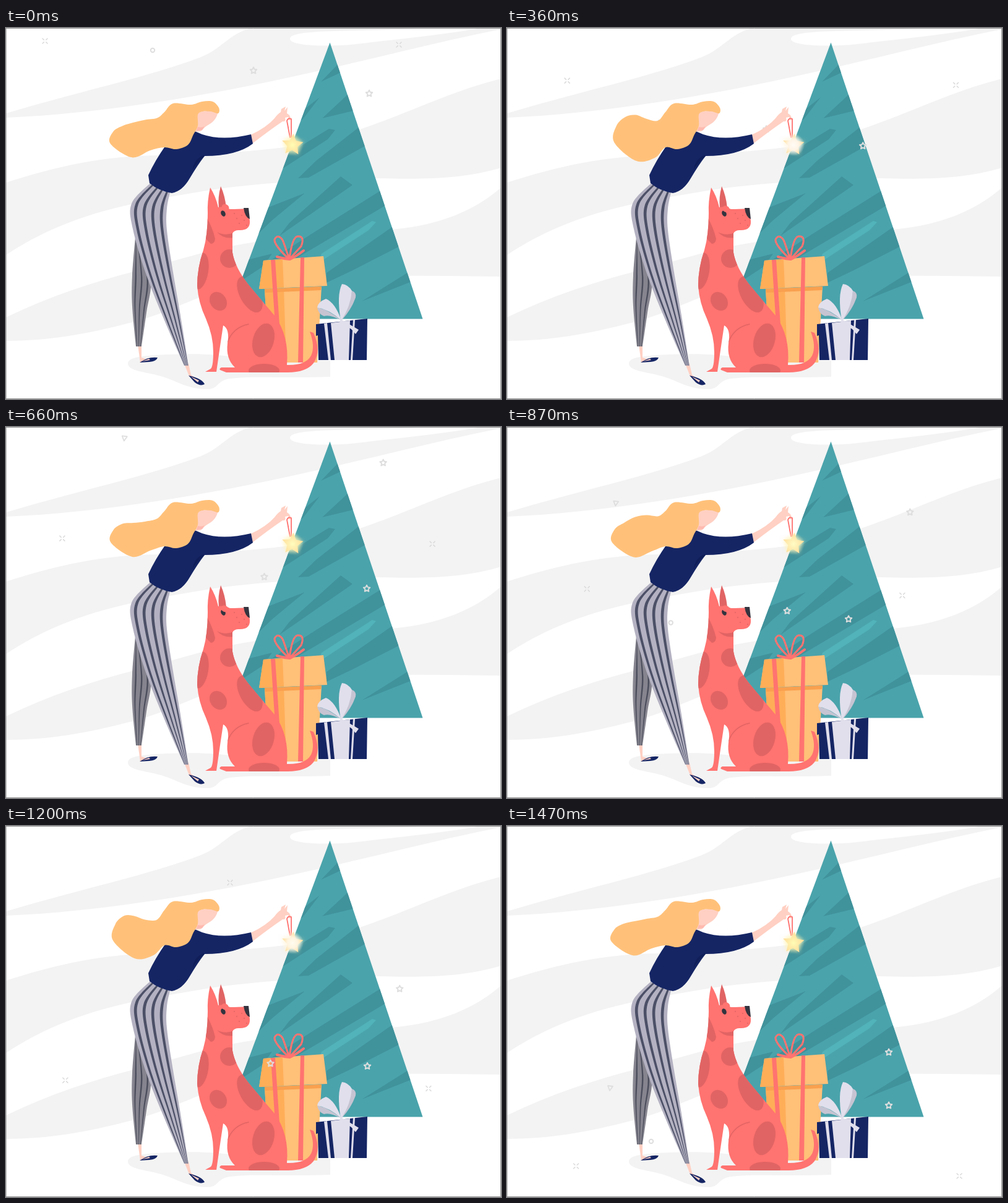
These frames come from a looping animation (800 px wide and 600 px high, 1500 ms). An HTML page with a canvas:

```html
<!DOCTYPE html>
<html lang="en">
<head>
<meta charset="utf-8">
<title>Trimming the tree</title>
<style>
html, body { margin: 0; width: 100%; height: 100%; overflow: hidden; background: #fff; }
canvas { display: block; }
</style>
</head>
<body>
<canvas id="stage" width="800" height="600"></canvas>
<script>
const ctx = document.getElementById('stage').getContext('2d');
const LOOP = 1500, STEP = 30;
const NAVY = '#152564', CORAL = '#ff7370', SPOT = '#e16464', SKIN = '#ffd0c3', HAIR = '#ffc17a',
  MIST = '#f3f3f3', TEAL = '#4aa3ab', DARK_TEAL = '#40929b', LILAC = '#e1dfec', GRAY_LILAC = '#c6c4d2';
const { PI, sin, cos, max } = Math;
const mix = (a, b, u) => a + (b - a) * u;

function fill(color, d) {
  ctx.fillStyle = color;
  ctx.fill(new Path2D(d));
}

function line(color, width, d) {
  ctx.strokeStyle = color;
  ctx.lineWidth = width;
  ctx.stroke(new Path2D(d));
}

function ellipse(color, x, y, rx, ry, angle = 0) {
  ctx.fillStyle = color;
  ctx.beginPath();
  ctx.ellipse(x, y, rx, ry, angle, 0, PI * 2);
  ctx.fill();
}

function clipped(d, draw) {
  ctx.save();
  ctx.clip(new Path2D(d));
  draw();
  ctx.restore();
}

// Adds a smooth curve through the points to the current path.
function trace(pts, closed = false) {
  const n = pts.length;
  const at = i => pts[closed ? (i + n) % n : Math.min(max(i, 0), n - 1)];
  ctx.lineTo(...pts[0]);
  for (let i = 0; i < (closed ? n : n - 1); i++) {
    const [p, a, b, q] = [at(i - 1), at(i), at(i + 1), at(i + 2)];
    ctx.bezierCurveTo(a[0] + (b[0] - p[0]) / 6, a[1] + (b[1] - p[1]) / 6,
      b[0] - (q[0] - a[0]) / 6, b[1] - (q[1] - a[1]) / 6, b[0], b[1]);
  }
}

function starPath(x, y, r, inner, turn = 0) {
  ctx.beginPath();
  for (let i = 0; i < 10; i++) {
    const a = turn - PI / 2 + i * PI / 5, d = i % 2 ? r * inner : r;
    ctx.lineTo(x + d * cos(a), y + d * sin(a));
  }
  ctx.closePath();
}

function drawBackground() {
  ctx.fillStyle = '#fff';
  ctx.fillRect(0, 0, 800, 600);
  fill(MIST, 'M0 138C120 102 235 78 315 47C350 33 358 11 396 0H800V2C690 24 590 51 480 75C330 109 150 139 0 145Z');
  fill('#fff', 'M459 18C457 9 490 6 530 5C590 4 640 2 690 0H768C700 12 640 17 575 25C530 31 460 30 459 18Z');
  fill(MIST, 'M0 250C80 224 160 206 250 206C340 204 400 199 450 193C590 174 680 112 800 82V226C740 244 680 245 600 243C500 244 400 252 330 262C220 281 110 294 0 367Z');
  fill(MIST, 'M0 468C70 434 140 411 210 393C300 370 350 350 450 340C560 332 600 329 632 325C700 318 757 296 800 258V402C650 400 480 398 400 410C310 428 270 460 200 477C130 495 70 506 0 506Z');
  fill(MIST, 'M197 543C197 532 220 530 260 528C310 526 350 528 380 534L524 538V564C450 567 400 562 362 567C338 571 345 585 323 584C290 583 278 571 250 563C225 556 198 555 197 543Z');
}

function drawTree() {
  const shape = 'M523.5 23.5L673.5 470.5H357Z';
  fill(TEAL, shape);
  clipped(shape, () => {
    fill(DARK_TEAL, 'M537 58L509 87L545 70Z M554 106L511 146L565 133Z M507 112L484 130L465 158L480 147Z'
      + 'M522 163L532 165L520 180L440 232L450 207Z M571 160L502 214L472 243L489 242L585 188Z'
      + 'M483 267L424 290L395 345L430 311Z M541 240L560 254L442 336L458 315Z'
      + 'M607 262L500 329L430 374L470 372L615 286Z M628 319L518 396L518 412L560 392L640 351Z'
      + 'M650 395L575 442L658 409Z M430 365L390 375L375 412L415 386Z');
    fill('#52b3ba', 'M592 312L598 314L586 327L505 380L510 365Z');
  });
}

function drawYellowGift() {
  fill('#ffc078', 'M418 422L510 418L503 541H425Z');
  fill('#ffae58', 'M418 422L449 421L453 541H425Z');
  fill('#f9a04f', 'M418 422L510 418L509 424L419 428Z');
  fill('#ffc078', 'M416 376L513 369L519 417L409 422Z');
  fill('#ffae58', 'M416 376L447 374L449 420L409 422Z');
  fill(CORAL, 'M428 375L435 375L446 541H439Z M476 371L482 371L480 541H472Z');
  ctx.lineCap = 'round';
  line(CORAL, 3, 'M458 374C444 362 433 348 434 342C438 333 446 338 449 348L458 374C460 358 464 338 471 337C480 336 481 343 477 353L458 374');
  line(CORAL, 4, 'M458 374Q448 373 438 370M459 374Q468 370 481 360');
}

function drawBlueGift() {
  fill(NAVY, 'M501 479L584 470L583 537H505L504 497L501 498Z');
  fill(LILAC, 'M525 477L556 473L554 537H531Z M514 478L519 477L525 537H521Z M561 472H564L560 537H557Z');
  fill(GRAY_LILAC, 'M503 452Q505 463 514 466Q524 463 542 473Q522 456 503 452Z');
  fill(LILAC, 'M542 473Q532 444 517 438Q504 443 503 452Q522 455 542 473Z');
  fill(LILAC, 'M541 473Q534 432 543 414Q553 415 559 425Q559 450 542 473Z');
  fill(GRAY_LILAC, 'M559 425Q567 428 565 436Q558 456 542 473Q557 450 559 425Z');
  fill(LILAC, 'M541 471L570 488L565 495L558 487L539 475Z');
}

// Each flake drops (accel bends the fall) while swaying through a number of half swings.
const flakes = [
  { shape: 'star', x: 428, y: 69, drop: 386, sway: -28 },
  { shape: 'star', x: 559, y: 106, drop: 346, sway: 28, drift: 30 },
  { shape: 'star', x: 600, y: -193, drop: 559, sway: -28, drift: 45 },
  { shape: 'cross', x: 87, y: 21, drop: 529, sway: -24, drift: 32, accel: 1.5, swings: 4.4, bend: .78 },
  { shape: 'cross', x: 683, y: 27, drop: 539, sway: -48, accel: 1.5, swings: 3, bend: .9 },
  { shape: 'cross', x: 362, y: -346, drop: 536, sway: 4 },
  { shape: 'ring', x: 253, y: 36, drop: 474, sway: -16, drift: -4 },
  { shape: 'triangle', x: 160, y: -312, drop: 736, sway: -28, drift: 35, swings: 6, bend: 1 }
];

const flakeShapes = {
  star(x, y) { starPath(x, y, 5.5, .5); ctx.stroke(); },
  ring(x, y) { ctx.beginPath(); ctx.arc(x, y, 3.2, 0, 7); ctx.stroke(); },
  triangle(x, y) { line('#dedede', 1.8, `M${x - 4} ${y - 4}l8 1l-5 7Z`); },
  cross(x, y) {
    for (const sx of [-1, 1]) for (const sy of [-1, 1])
      line('#dadada', 1.5, `M${x + sx * 1.7} ${y + sy * 1.7}l${sx * 2.3} ${sy * 2.3}`);
  }
};

function drawFlakes(t) {
  const u = t / (LOOP - STEP);
  ctx.lineCap = ctx.lineJoin = 'round';
  for (const { shape, x, y, drop, sway, drift = 0, accel = 1, swings = 4, bend = .65 } of flakes) {
    ctx.strokeStyle = '#dedede';
    ctx.lineWidth = 2;
    flakeShapes[shape](x + drift * u + sway * cos(PI * swings * u ** bend), y + drop * u ** accel);
  }
}

// A trouser leg between two edges; its stripes run at fixed fractions of the width.
function drawLeg(left, right, color, stripeColor, stripes) {
  const edge = f => left.map(([x, y], i) => [mix(x, right[i][0], f), mix(y, right[i][1], f)]);
  const band = (from, to, fillColor) => {
    ctx.beginPath();
    trace(edge(from));
    trace(edge(to).reverse());
    ctx.fillStyle = fillColor;
    ctx.fill();
  };
  band(0, 1, color);
  for (let i = 0; i < stripes; i++) {
    const middle = (i + .62) / (stripes + .2);
    band(middle - .04, middle + .04, stripeColor);
  }
}

function drawLegs() {
  fill(SKIN, 'M213 512H219L219 533L228 536L217 541Z M288 543L295 543L299 561L313 571L296 563Z');
  fill(NAVY, 'M216 541Q230 531 245 533Q243 539 232 540ZM295 562Q317 567 321 576Q314 580 305 573Z');
  fill(SKIN, 'M220 539L231 535L233 537ZM299 564L312 570L310 573Z');
  drawLeg([[209, 338], [204, 400], [204, 450], [210, 515]],
    [[215, 340], [234, 405], [227, 460], [219, 515]], '#86858f', '#4b4d5c', 3);
  drawLeg([[233, 251], [203, 284], [205, 325], [227, 400], [257, 475], [288, 546]],
    [[265, 266], [260, 292], [260, 327], [270, 395], [282, 465], [295, 546]], '#b4b2c2', '#4c5067', 4);
}

function drawOrnament(t) {
  const glow = .5 - .5 * cos(4 * PI * t / LOOP);
  line(CORAL, 1.8, 'M459 177L454 150Q456 145 461 147L461 177');
  ctx.save();
  ctx.shadowColor = '#ffeeb4';
  ctx.shadowBlur = 7;
  ctx.fillStyle = '#ffdf9c';
  starPath(463, 189, 18, .48, .08);
  ctx.fill();
  ctx.restore();
  const halo = ctx.createRadialGradient(463, 189, 1, 463, 189, 18);
  const tone = Math.round(mix(180, 248, glow));
  halo.addColorStop(0, `rgba(255,252,${tone},.95)`);
  halo.addColorStop(.45, `rgba(255,250,${tone},${mix(.45, .8, glow)})`);
  halo.addColorStop(1, `rgba(255,250,${tone},0)`);
  ellipse(halo, 463, 189, 18, 18);
}

function drawTorso() {
  fill(SKIN, 'M395 173Q421 161 434 146Q439 139 444 136L445 131L452 127L450 134L455 128L454 138L458 141Q462 148 458 150L456 144L451 145Q453 152 447 151Q425 166 398 187Z');
  fill(NAVY, 'M303 166L317 172Q350 183 396 172L399 187Q373 207 321 207Q310 221 297 243Q285 264 268 267Q246 263 232 251L230 238Q241 214 258 190Q276 170 303 166Z');
  fill('#101e58', 'M320 206Q306 209 301 230Q309 216 321 207Z');
  fill(SKIN, 'M309 136L343 132Q342 148 328 156Q321 160 318 164Q315 169 303 167Z');
  fill('#ffb9ae', 'M310 160Q316 162 321 159L317 165L308 166Z');
}

const hairline = [[256, 193], [275, 196], [294, 189], [303, 172], [310, 158], [310, 140], [318, 135],
  [331, 135], [343, 138], [344, 129], [334, 119], [317, 119], [299, 124], [270, 122]];
const tresses = [[256, 136], [244, 148], [225, 148], [207, 147], [190, 151], [175, 163], [171, 186], [206, 212], [236, 204]];

// A wave runs along the loose hair: the upper and lower edges heave in opposition.
function drawHair(t) {
  const swing = 4 * PI * t / LOOP;
  const loose = tresses.map(([x, y], i) => {
    const heave = cos(swing + .75 * max(0, 4 - i));
    return [x - 3 * heave * i / 8, y + 8 * sin(i / 2) * heave];
  });
  ctx.beginPath();
  trace([...hairline, ...loose], true);
  ctx.fillStyle = HAIR;
  ctx.fill();
}

function drawDog(t) {
  fill(SPOT, 'M347 256Q342 274 344 291L356 291Q354 271 347 256Z');
  const body = 'M330 258Q325 280 326 300Q326 335 319 359Q309 388 309 417Q311 445 323 470Q335 498 335 524Q335 547 331 551L322 556H340Q346 514 351 481'
    + 'Q362 487 358 510Q355 535 370 549L348 549Q344 551 346 553L356 557H455Q485 557 497 542Q510 522 497 493L491 491Q500 515 493 530Q484 546 454 545'
    + 'Q458 498 434 465Q405 431 391 414Q370 387 366 363L366 332Q369 327 376 327Q395 328 394 312L391 292Q373 293 362 293Q352 288 343 290Q339 272 330 258Z';
  fill(CORAL, body);
  clipped(body, () => {
    fill(SPOT, 'M324 306Q334 323 338 341Q337 349 331 349L319 337ZM341 330Q354 337 368 331V339Q352 342 341 330Z');
    ellipse(SPOT, 361, 373, 15, 15);
    ellipse(SPOT, 314, 393, 13, 30, .16);
    ellipse(SPOT, 394, 431, 16, 32, -.5);
    ellipse(SPOT, 343, 442, 13, 16, -.6);
    ellipse(SPOT, 416, 505, 17, 28, .28);
    ellipse(SPOT, 417, 554, 25, 11);
    line(SPOT, 1.5, 'M358 508Q367 484 392 479');
  });
  fill('#33343f', 'M384 291H392L394 309Q386 306 384 291Z');
  for (let i = 0; i < 6; i++) ellipse(SPOT, 369 + i * 4, 300 + i * 8 % 21, 1, 1);

  const lid = .55 * sin(PI * t / LOOP);
  ellipse('#33343f', 351, 300, 3.5, 5, -.45);
  ellipse(CORAL, 354.5 - lid * 2, 290 + lid * 7, 6, 5, .4);
}

function drawScene(t) {
  drawBackground();
  drawTree();
  drawYellowGift();
  drawBlueGift();
  drawFlakes(t);
  drawLegs();
  drawTorso();
  drawHair(t);
  drawOrnament(t);
  drawDog(t);
  ctx.strokeStyle = '#929292';
  ctx.lineWidth = 1;
  ctx.strokeRect(.5, .5, 799, 599);
}

const start = performance.now();
function tick() {
  const elapsed = (performance.now() - start) % LOOP;
  drawScene(Math.floor(elapsed / STEP) * STEP);
  requestAnimationFrame(tick);
}
tick();
</script>
</body>
</html>
```
